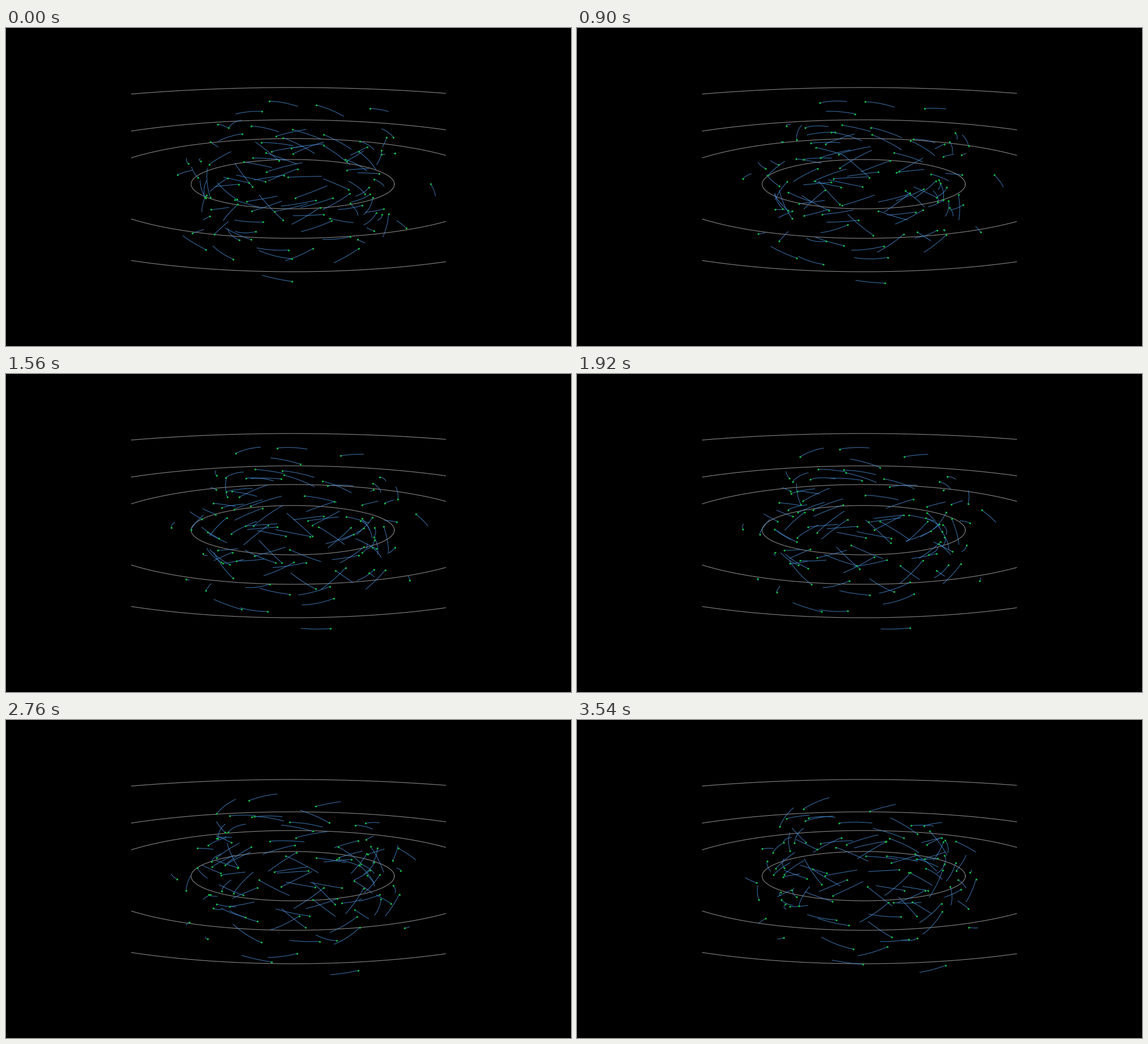
These frames come from a looping animation (998 px wide and 561 px high, 3600 ms). A matplotlib script:

```python
import numpy as np
import matplotlib.pyplot as plt
from matplotlib.animation import FuncAnimation
from matplotlib.collections import LineCollection
from matplotlib.patches import Rectangle

W, H, DPI = 998, 561, 64
PX = 72 / DPI  # points per pixel
FRAMES, STEP_MS, TRAIL = 60, 60, 20
LAST = FRAMES - 1
CENTER = np.array([506, 275])
UNIT = 179.5  # radius of the innermost ring
SWARM = 91

# centre y, radii; the widest ring shows only its far half
RINGS = [(275.5, UNIT, 43.5), (283, 361, 88), (296, 545, 134), (325, 895, 220)]

# the outermost bodies: start x, y, end x, y, swept angle
KEY_BODIES = [
    (505, 447, 651, 433, 0.63), (750, 275, 669, 214, 0.60),
    (548, 136, 400, 157, 0.92), (452, 147, 601, 201, 0.92),
    (643, 142, 517, 161, 0.63), (353, 391, 505, 431, 0.62),
    (303, 259, 317, 287, 0.81), (707, 353, 692, 366, 0.70),
]


def key_orbit(x0, y0, x1, y1, sweep):
    """Ellipse axes that carry a body from its start to its end."""
    start, end = np.array([x0, y0]) - CENTER, np.array([x1, y1]) - CENTER
    return sweep, start, (end - start * np.cos(sweep)) / np.sin(sweep)


def swarm_orbits(count):
    """Tilted circular orbits seen from slightly above the ring plane."""
    rng = np.random.default_rng(7)
    radius = rng.triangular(125, 155, 215, count)
    tilt = np.radians(np.minimum(rng.rayleigh(20, count), 46))
    node, phase = rng.uniform(0, 2 * np.pi, (2, count))

    def project(u):
        along, across = np.cos(u), np.sin(u) * np.cos(tilt)
        x = np.cos(node) * along - np.sin(node) * across
        depth = np.sin(node) * along + np.cos(node) * across
        up = np.sin(u) * np.sin(tilt)
        return radius[:, None] * np.column_stack([x, -0.24 * depth - 0.97 * up])

    sweep = 0.92 * (UNIT / radius) ** 1.5  # Kepler's third law
    return sweep, project(phase), project(phase + np.pi / 2)


key_orbits = [np.array(part) for part in zip(*(key_orbit(*b) for b in KEY_BODIES))]
sweep, cos_axis, sin_axis = (
    np.concatenate(pair) for pair in zip(key_orbits, swarm_orbits(SWARM)))


def paths(frame):
    """Trail points of all bodies, oldest first: (body, point, xy)."""
    t = np.arange(frame - TRAIL, frame + 1) / LAST
    angle = (sweep[:, None] * t)[..., None]
    return (CENTER + cos_axis[:, None] * np.cos(angle)
            + sin_axis[:, None] * np.sin(angle))


fig = plt.figure(figsize=(W / DPI, H / DPI), dpi=DPI, facecolor="black")
ax = fig.add_axes([0, 0, 1, 1])
ax.set_xlim(0, W)
ax.set_ylim(H, 0)
ax.axis("off")

view = Rectangle((221, 0), 556, H, transform=ax.transData)
for cy, rx, ry in RINGS:
    a = np.linspace(0, np.pi if rx > 800 else 2 * np.pi, 721)
    ring, = ax.plot(506.5 + rx * np.cos(a), cy - ry * np.sin(a),
                    color="#888888", lw=1.1 * PX, zorder=1)
    ring.set_clip_path(view)

trails = LineCollection([], colors="#4a90d9", alpha=0.75, linewidths=1.1 * PX,
                        capstyle="butt", zorder=2)
ax.add_collection(trails, autolim=False)
heads, = ax.plot([], [], "o", color="#12b442", ms=3.3 * PX, mew=0, zorder=3)


def draw(frame):
    points = paths(frame)
    trails.set_segments(list(points))
    heads.set_data(points[:, -1, 0], points[:, -1, 1])
    return trails, heads


anim = FuncAnimation(fig, draw, frames=FRAMES, interval=STEP_MS,
                     repeat=True, repeat_delay=0, blit=False)
plt.show()
```
